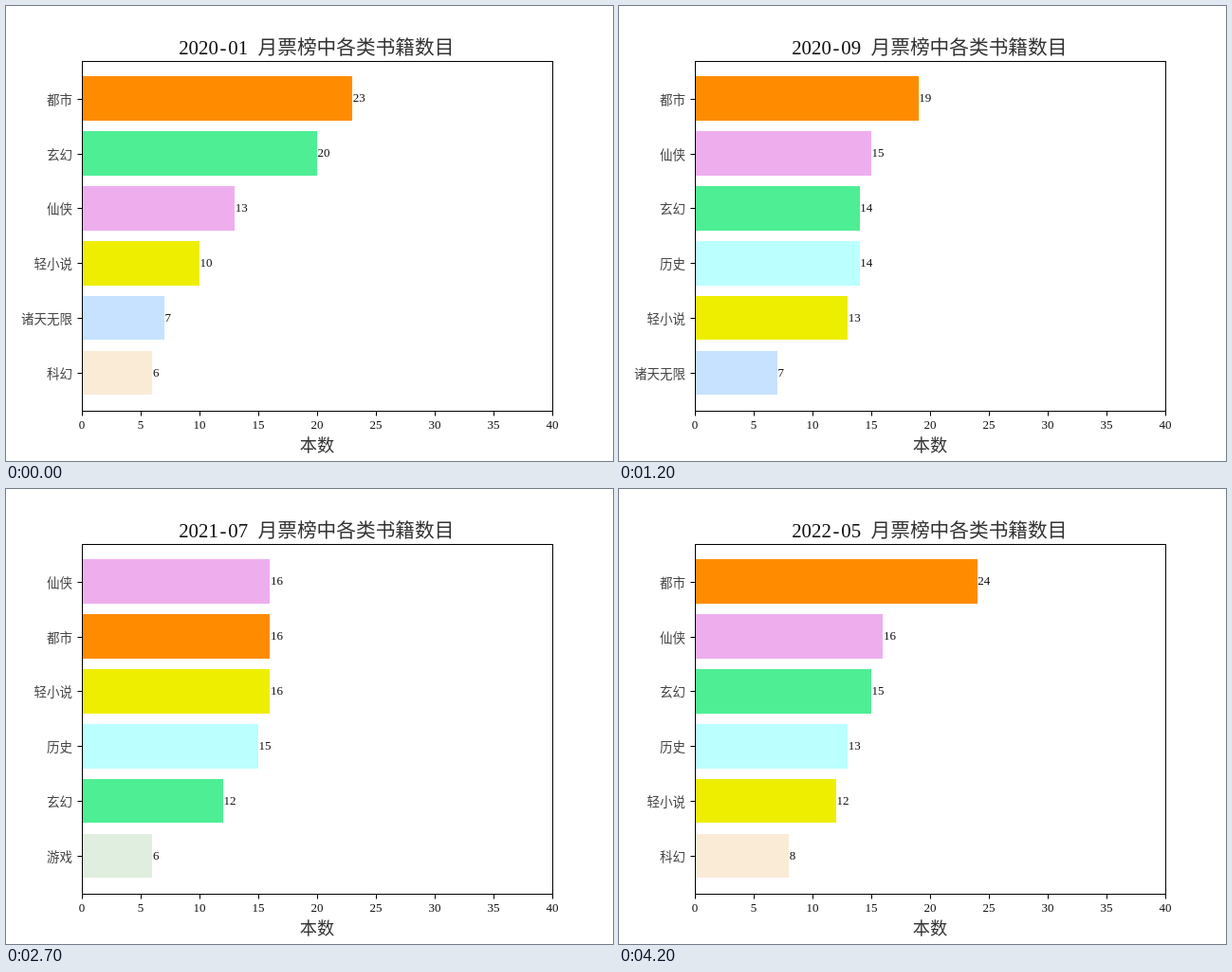
An HTML page for the animation above (4.35 s loop, 640 px wide and 480 px high).

```html
<!DOCTYPE html>
<html lang="zh-CN">
<head>
<meta charset="utf-8">
<title>月票榜中各类书籍数目</title>
<style>
  html, body { margin: 0; width: 100%; height: 100%; overflow: hidden; background: #fff; }
  svg { display: block; }
  text { font: 13px "Liberation Serif", serif; fill: #111; }
  .cjk { font: 300 13.5px "Noto Sans CJK SC", "Noto Sans CJK", sans-serif; fill: #444; }
  .title { font-size: 20.83px; }
  .title.cjk { font-size: 20.7px; fill: #333; }
  .axis { font-size: 18.2px; fill: #333; }
  .end { text-anchor: end; }
  .mid { text-anchor: middle; }
  .line { fill: none; stroke: #000; }
</style>
</head>
<body>
<svg id="stage" width="640" height="480" viewBox="0 0 640 480"></svg>
<script>
const STEP = 150, MONTHS = 29, ROWS = 6;
const LEFT = 80, UNIT = 12.4, TOP = 97.57, PITCH = 57.93, BAR = 46.34;

// Piecewise linear curve through one value per key month.
const keys = [0, 3, 8, 14, 18, 21, 28];
const through = (...values) => m => {
  const k = Math.max(1, keys.findIndex(key => key >= m));
  const p = (m - keys[k - 1]) / (keys[k] - keys[k - 1]);
  return values[k - 1] + (values[k] - values[k - 1]) * p;
};

// Genres in tie-breaking order: name, colour, count by month.
const genres = [
  ['仙侠', '#eeaeee', through(13, 14, 15, 18, 16, 18, 16)],
  ['都市', '#ff8c00', through(23, 21, 19, 15, 16, 24, 24)],
  ['玄幻', '#4eee94', through(20, 15, 14, 12, 12, 12, 15)],
  ['轻小说', '#eeee00', through(10, 8, 13, 15, 16, 11, 12)],
  ['历史', '#bbffff', through(5, 11, 14, 10, 15, 14, 13)],
  ['科幻', '#faebd7', through(6, 5, 6, 7, 5, 10, 8)],
  ['游戏', '#e0eee0', m => 6 + Math.sin(m / 2)],
  ['诸天无限', '#c6e2ff', m => 7.4 - m * m / 100]
];

const stage = document.getElementById('stage');

function add(tag, attrs, text = '') {
  const el = document.createElementNS('http://www.w3.org/2000/svg', tag);
  for (const k in attrs) el.setAttribute(k, attrs[k]);
  el.textContent = text;
  return stage.appendChild(el);
}

const label = (x, y, cls, text = '') => add('text', { x, y, class: cls }, text);
const line = d => add('path', { d, class: 'line' });

add('rect', { width: 640, height: 480, fill: '#fff' });

const year = label(182.2, 50.5, 'title');
label(229, 50.5, 'title mid', '-');
const month = label(234.3, 50.5, 'title');
label(265.5, 50.5, 'title cjk', '月票榜中各类书籍数目');
label(328, 470, 'cjk axis mid', '本数');

const rows = Array.from({ length: ROWS }, (_, i) => {
  const mid = TOP + i * PITCH;
  const y = Math.round(mid - BAR / 2);
  const row = {
    bar: add('rect', { x: LEFT, y, height: Math.round(mid + BAR / 2) - y }),
    name: label(69.9, mid + 6, 'cjk end'),
    count: label(0, mid + 3.6, '')
  };
  line(`M75.5 ${Math.round(mid) + 0.5}h5`);
  return row;
});

add('rect', { x: 80.5, y: 58.5, width: 496, height: 369, class: 'line' });
for (let v = 0; v <= 40; v += 5) {
  const x = LEFT + v * UNIT;
  line(`M${x + 0.5} 427.5v5`);
  label(x, 446, 'mid', v);
}

function draw(time) {
  const m = Math.floor(time / STEP) % MONTHS;
  year.textContent = 2020 + Math.floor(m / 12);
  month.textContent = String(m % 12 + 1).padStart(2, '0');

  const ranked = genres
    .map(([name, color, curve]) => ({ name, color, n: Math.round(curve(m)) }))
    .sort((a, b) => b.n - a.n);

  rows.forEach(({ bar, name, count }, i) => {
    const g = ranked[i], w = g.n * UNIT;
    bar.setAttribute('width', Math.round(w));
    bar.setAttribute('fill', g.color);
    name.textContent = g.name;
    count.setAttribute('x', LEFT + w + 0.6);
    count.textContent = g.n;
  });
}

const start = performance.now();

function tick() {
  draw(performance.now() - start);
  requestAnimationFrame(tick);
}

draw(0);
requestAnimationFrame(tick);
</script>
</body>
</html>
```
